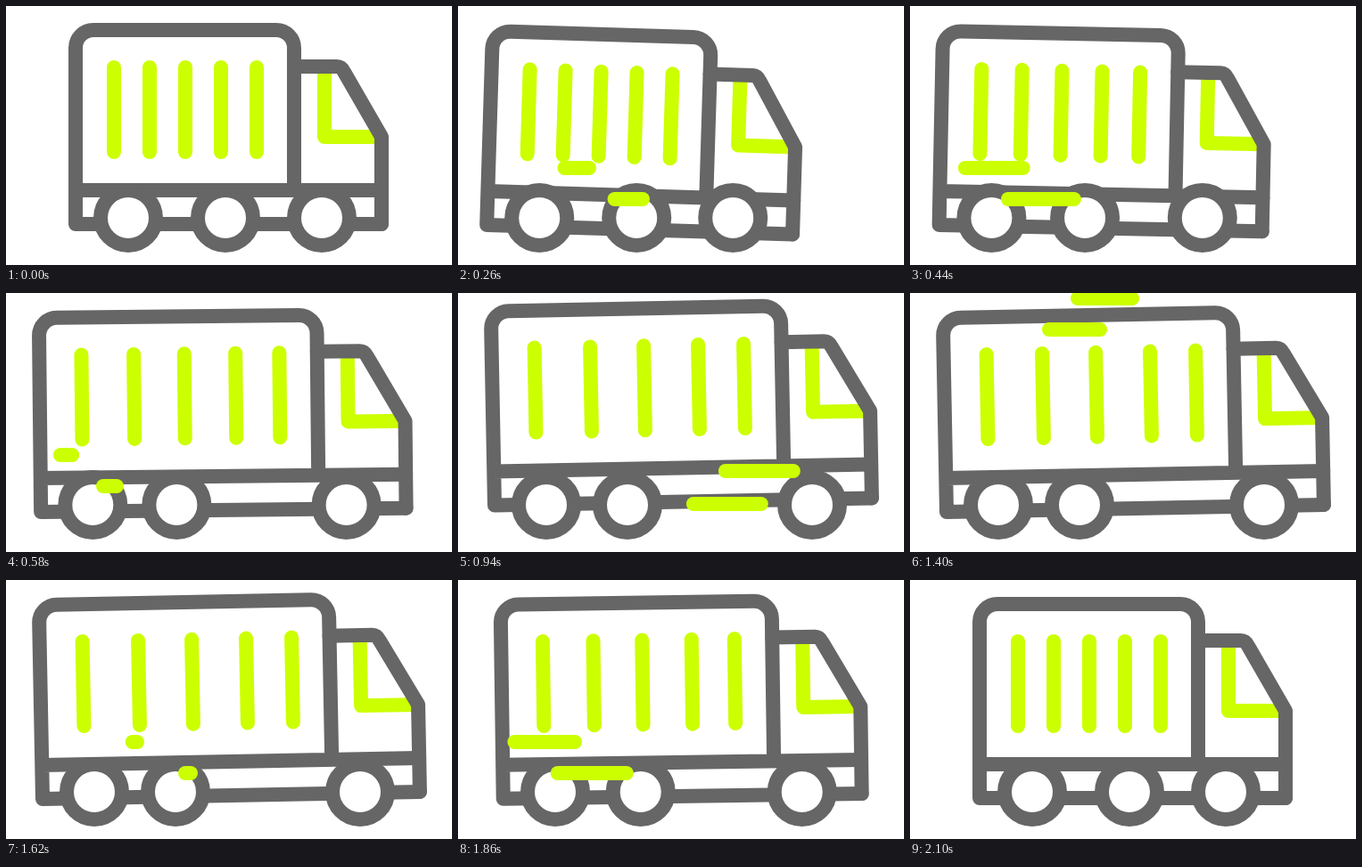
Recreate the animation shown at these times as an HTML page. Size 500 by 291 pixels, loop 2500 ms.

```html
<!DOCTYPE html>
<html lang="en">
<head>
<meta charset="utf-8">
<title>Truck</title>
<style>
  html, body { margin: 0; width: 100%; height: 100%; overflow: hidden; background: #fff; }
  svg { display: block; width: 100vw; height: 100vh; }
  path, line, circle { fill: none; stroke-width: 16; stroke-linejoin: round; }
  .frame, .wheel { stroke: #666; }
  .wheel { fill: #fff; }
  .lime { stroke: #cf0; }
  .round { stroke-linecap: round; }
</style>
</head>
<body>
<svg viewBox="0 0 500 291">
  <g id="body">
    <path id="glass" class="lime" d="M357 68V147H421"/>
    <g id="stripes"></g>
    <path id="box" class="frame round"/>
    <path id="cab" class="frame round" d="M323 68H371Q376 68 379 74L421 147V245"/>
  </g>
  <g id="wheels"></g>
  <g id="streaks"></g>
</svg>
<script>
const LOOP = 2500;
const $ = id => document.getElementById(id);

function add(parent, tag, cls, attrs) {
  const el = document.createElementNS('http://www.w3.org/2000/svg', tag);
  el.setAttribute('class', cls);
  set(el, attrs);
  parent.appendChild(el);
  return el;
}

function set(el, attrs) {
  for (const key in attrs) el.setAttribute(key, attrs[key]);
}

// Smooth 0..1 progress between two times
function ease(t, from, to) {
  const u = Math.min(1, Math.max(0, (t - from) / (to - from)));
  return u * u * (3 - 2 * u);
}

// Extra offset of each stripe at full stretch
const stripes = [5, 27.5, 47.5, 68.5, 79.5].map((spread, i) => ({
  x: 121 + 40 * i,
  spread,
  el: add($('stripes'), 'line', 'lime round', { y1: 69, y2: 164 })
}));

const wheels = [[137, 10], [246, -8], [354, 91]].map(([x, spread]) => ({
  x, spread, el: add($('wheels'), 'circle', 'wheel', { cy: 238, r: 31 })
}));

// Start time, y, right end, left end
const streaks = [
  [140, 182, 147, 61], [140, 217, 207, 109],
  [660, 200, 391, 296], [660, 237, 355, 260],
  [1080, 41, 240, 156], [1080, 6, 278, 188],
  [1573, 182, 147, 61], [1573, 217, 207, 109]
].map(([start, y, right, left]) => ({
  start, right, left,
  el: add($('streaks'), 'line', 'lime round', { y1: y, y2: y })
}));

function boxPath(w) {
  const r = 323 + w, end = 421 + w;
  return `M78 245V47A20 20 0 0 1 98 27H${r - 20}A20 20 0 0 1 ${r} 47V207` +
    `M78 207H${end}M78 245H${end}`;
}

function draw(t) {
  const pull = ease(t, 0, 300);
  const go = ease(t, 335, 668);
  const away = 1 - ease(t, 1740, 2100);
  const stretch = go * away;
  const width = 80 * stretch;
  const shift = (11 * go - 48 * pull) * away;
  const tilt = (1.85 * pull - 2.95 * go) * away;
  const hop = ease(t, 660, 920) - ease(t, 940, 1280);
  const drop = pull * away - 7.5 * hop;

  set($('body'), { transform: `translate(${shift} ${drop}) rotate(${tilt} 78 245)` });
  set($('box'), { d: boxPath(width) });
  for (const id of ['cab', 'glass']) set($(id), { transform: `translate(${width} 0)` });

  for (const s of stripes) {
    const x = s.x + s.spread * stretch;
    set(s.el, { x1: x, x2: x });
  }
  for (const w of wheels) {
    set(w.el, { cx: w.x - 48 * pull * away + w.spread * stretch });
  }
  for (const s of streaks) {
    const age = t - s.start;
    const at = p => s.right + (s.left - s.right) * p;
    set(s.el, {
      x1: at(ease(age, 200, 520)),
      x2: at(ease(age, 0, 320)),
      visibility: age > 0 && age < 520 ? 'visible' : 'hidden'
    });
  }
}

const begin = performance.now();
function tick() {
  draw((performance.now() - begin) % LOOP);
  requestAnimationFrame(tick);
}
draw(0);
requestAnimationFrame(tick);
</script>
</body>
</html>
```
